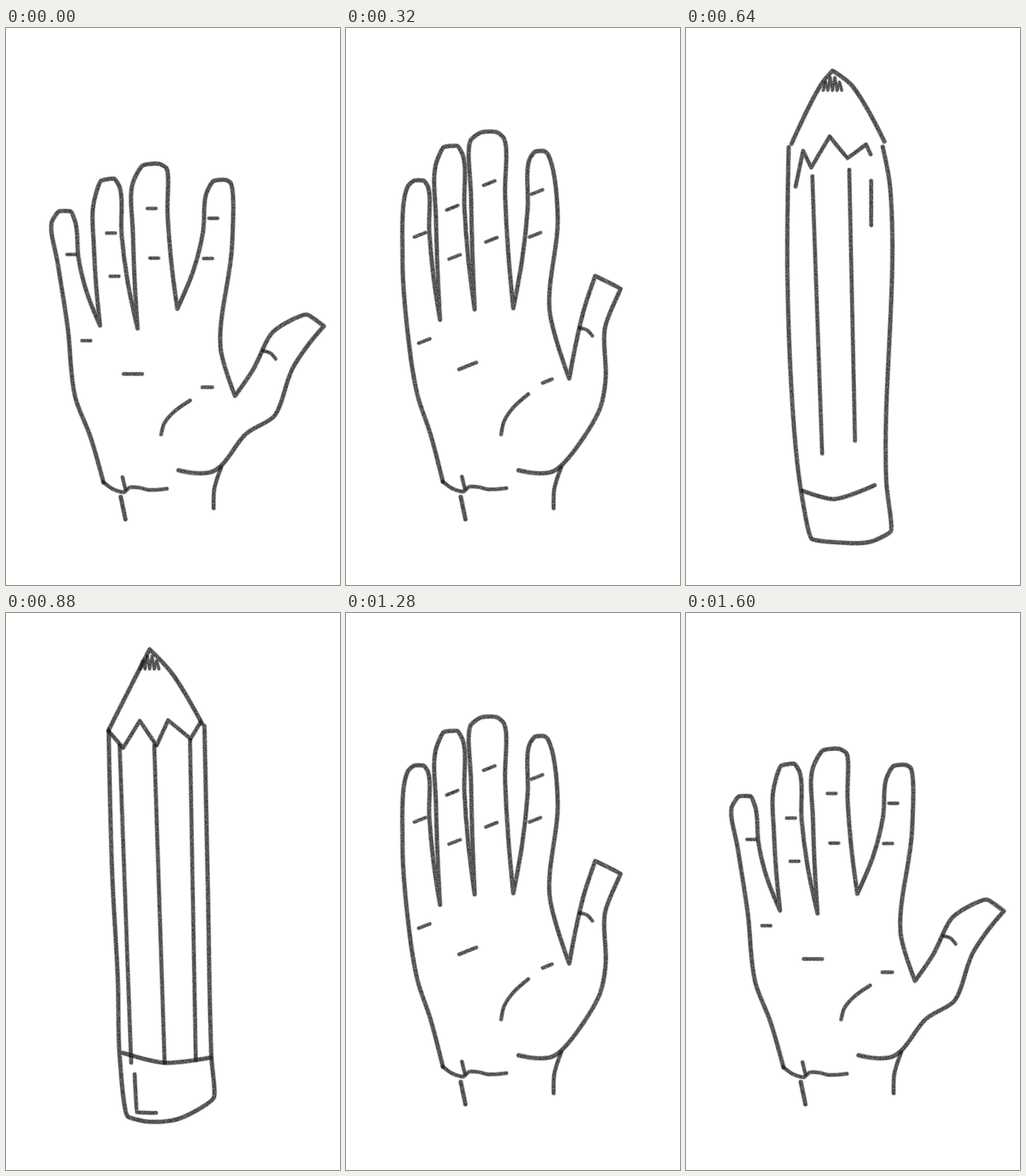
Animation of 579 by 966 pixels, one loop 1680 ms. Source, as an HTML page with a canvas:

```html
<!DOCTYPE html>
<html lang="en">
<head>
<meta charset="utf-8">
<title>Hand and pencil</title>
<style>
html, body { margin: 0; width: 100%; height: 100%; overflow: hidden; background: #fff; }
canvas { display: block; width: 579px; height: 966px; }
</style>
</head>
<body>
<canvas id="stage" width="579" height="966"></canvas>
<script>
const ctx = document.getElementById('stage').getContext('2d');
const STEP = 80;

// Hand poses. A finger is left shoulder, right shoulder, height of the tip.
const open = {
  fused: 0, tilt: 0, creases: 1,
  side: [169,788, 146,708, 120,640, 107,520, 90,410],
  fingers: [[79,338, 121,340, 316], [151,310, 197,276, 260], [219,272, 278,243, 235], [347,288, 389,268, 263]],
  valleys: [[163,516], [228,521], [297,487]],
  web: [392,375, 372,555, 397,638],
  thumb: [428,593, 463,527, 521,497, 551,517, 525,548, 497,590, 465,673],
  palm: [269,705, 319,646], lifeLine: [220,600]
};
const relaxed = {
  fused: 0, tilt: -.38, creases: 1,
  side: [168,787, 146,703, 124,637, 106,520, 98,400],
  fingers: [[107,275, 142,275, 264], [155,240, 203,222, 203], [216,195, 274,192, 180], [318,228, 351,221, 213]],
  valleys: [[163,506], [223,488], [290,486]],
  web: [367,325, 353,490, 387,608],
  thumb: [398,550, 412,490, 432,430, 476,452, 449,520, 450,610, 441,658],
  palm: [269,705, 316,635], lifeLine: [211,586]
};
const closed = {
  fused: 1, tilt: -.4, creases: 0,
  side: [192,779, 165,705, 147,605, 136,460, 144,285],
  fingers: [[174,196, 208,171, 173], [222,150, 252,120, 121], [252,120, 301,142, 115], [301,142, 339,139, 136]],
  valleys: [[180,299], [246,322], [291,467]],
  web: [360,245, 364,400, 375,562],
  thumb: [364,408, 357,390, 368,371, 400,388, 428,460, 428,550, 436,645],
  palm: [276,619, 328,535], lifeLine: [191,390]
};

const sharp = {
  body: [178,205, 184,450, 194,640, 197,768, 211,873, 245,882, 300,877, 360,841, 356,768, 350,480, 344,196],
  tip: [178,203, 225,110, 249,63, 288,105, 340,192],
  wood: [178,205, 203,234, 232,187, 261,230, 281,186, 320,218, 337,190],
  grooves: [[197,230, 217,780], [257,230, 275,780], [319,220, 329,775]],
  band: [203,763, 275,780, 355,771],
  shine: [223,800, 227,866, 260,867]
};
const blunt = {
  body: [178,207, 176,440, 187,690, 199,800, 218,886, 260,892, 320,891, 355,873, 347,783, 354,278, 341,206],
  tip: [183,201, 235,97, 254,74, 286,98, 344,197],
  wood: [190,275, 203,213, 217,242, 249,188, 280,226, 312,202, 320,219],
  grooves: [[219,257, 236,738], [283,246, 293,716], [321,265, 321,342]],
  band: [203,803, 256,817, 327,793]
};

// Blends numbers, lists and objects alike; keys must exist on both sides.
function mix(a, b, t) {
  if (typeof a === 'number') return a + (b - a) * t;
  if (Array.isArray(a)) return a.map((v, i) => mix(v, b[i], t));
  return Object.fromEntries(Object.keys(a).filter(k => k in b).map(k => [k, mix(a[k], b[k], t)]));
}

const pairs = flat => Array.from({ length: flat.length / 2 }, (_, i) => [flat[2 * i], flat[2 * i + 1]]);

// Starts upright and bends towards its end.
const bend = (from, to, start = 0) => [0, 1, 2, 3].map(i => {
  const t = start + (1 - start) * i / 3;
  return [mix(from[0], to[0], t * t), mix(from[1], to[1], t)];
});

const dash = ([x, y], length, tilt) => {
  const dx = Math.cos(tilt) * length / 2, dy = Math.sin(tilt) * length / 2;
  return [[x - dx, y - dy], [x + dx, y + dy]];
};

const cap = ([lx, ly, rx, ry, top]) => [
  [lx, ly], [mix(lx, rx, .3), mix(top, ly, .1)], [mix(lx, rx, .8), mix(top, ry, .1)], [rx, ry]
];

// Tangents shrink as corners get sharper, so points stay pointed.
function handle(points, i) {
  if (!points[i - 1] || !points[i + 1]) return [0, 0];
  const unit = (a, b) => {
    const d = Math.hypot(b[0] - a[0], b[1] - a[1]) || 1;
    return [(b[0] - a[0]) / d, (b[1] - a[1]) / d];
  };
  const u = unit(points[i - 1], points[i]), v = unit(points[i], points[i + 1]);
  const flat = Math.max(0, u[0] * v[0] + u[1] * v[1]);
  return [(u[0] + v[0]) * flat / 6, (u[1] + v[1]) * flat / 6];
}

function stroke(width, points) {
  ctx.beginPath();
  ctx.moveTo(...points[0]);
  for (let i = 1; i < points.length; i++) {
    const [a, b] = [points[i - 1], points[i]], d = Math.hypot(b[0] - a[0], b[1] - a[1]);
    const u = handle(points, i - 1), v = handle(points, i);
    ctx.bezierCurveTo(a[0] + u[0] * d, a[1] + u[1] * d, b[0] - v[0] * d, b[1] - v[1] * d, ...b);
  }
  for (const [grow, alpha] of [[1, .35], [-1.4, .85]]) {
    ctx.lineWidth = width + grow;
    ctx.globalAlpha = alpha;
    ctx.stroke();
  }
}

function drawHand({ fused, tilt, creases, side, fingers, valleys, web, thumb, palm, lifeLine }) {
  const together = fused > .5;
  const heel = [[416,704], [372,760], [356,770], [328,772], [299,767]];
  const outline = pairs(side);
  fingers.forEach((finger, i) => {
    outline.push(...cap(finger));
    if (i === 3) return;
    const start = together ? .3 : 0;
    const down = bend(finger.slice(2, 4), valleys[i], start);
    const up = bend(fingers[i + 1], valleys[i], start).reverse();
    if (together) stroke(8, [...down, ...up]);
    else outline.push(...down.slice(1), ...up.slice(1, -1));
  });
  outline.push(...pairs(web));
  const rest = [...pairs(thumb), ...heel];
  if (together) stroke(8, rest); else outline.push(...rest);
  stroke(8, outline);

  const [x, y] = side;
  const fold = [0,0, 17,12, 36,17, 45,9, 61,9, 78,13, 110,11];
  stroke(7, pairs(fold).map(([dx, dy]) => [x + dx, y + dy]));
  stroke(7, [[x + 33, y - 9], [x + 38, y + 12]]);
  stroke(7.5, [[373,762], [361,800], [360,833]]);
  stroke(8, [[199,813], [207,852]]);
  stroke(7 + 2 * fused, bend(palm.slice(0, 2), palm.slice(2)));
  stroke(7, dash(lifeLine, 32, tilt));
  if (creases < 1) return;

  const roots = [side.slice(6, 8), ...valleys, web.slice(2, 4)];
  const places = [[.38, 1.12], [.37, .66], [.29, .61], [.26, .53]];
  fingers.forEach(([lx, , rx, , top], i) => {
    const root = mix(roots[i], roots[i + 1], .5);
    for (const t of places[i]) stroke(6.5, dash(mix([(lx + rx) / 2, top], root, t), 15 - 15 * tilt, tilt));
  });
  stroke(7, dash([349, 623 + 28 * tilt], 17, tilt));
  const joint = mix(thumb.slice(0, 2), thumb.slice(2, 4), .5);
  stroke(6.5, [joint, [joint[0] + 13, joint[1] + 4], [joint[0] + 22, joint[1] + 14]]);
}

function drawPencil({ body, tip, wood, grooves, band, shine = [] }) {
  stroke(8, pairs(body));
  stroke(8, pairs(tip));
  stroke(7.5, pairs(wood));
  stroke(8, pairs(band));
  grooves.forEach(g => stroke(7.5, pairs(g)));
  if (shine.length) stroke(7.5, pairs(shine));
  const [x, y] = tip.slice(4);
  stroke(6, Array.from({ length: 9 }, (_, i) =>
    [x + (i - 4) * 4, y + (i % 2 ? 8 + 4 * Math.abs(i - 4) : 34)]));
}

function makeGrain(size) {
  const tile = document.createElement('canvas');
  tile.width = tile.height = size;
  const g = tile.getContext('2d');
  let seed = 7;
  for (let y = 0; y < size; y++) for (let x = 0; x < size; x++) {
    seed = (seed * 1664525 + 1013904223) >>> 0;
    g.fillStyle = `rgba(24,24,24,${.5 + .5 * seed / 2 ** 32})`;
    g.fillRect(x, y, 1, 1);
  }
  return ctx.createPattern(tile, 'repeat');
}

const poses = [
  ...[0, .25, .5, .75, 1].map(t => mix(open, relaxed, t)),
  mix(relaxed, closed, .5), closed,
  { ...mix(sharp, blunt, 1.8), grooves: blunt.grooves },
  blunt, sharp, { ...sharp, ...mix(sharp, blunt, -.12) }
];

ctx.strokeStyle = makeGrain(256);
ctx.lineCap = ctx.lineJoin = 'round';

// The poses play forwards and then back.
const last = poses.length - 1;
let shown;
function frame() {
  const step = Math.floor(performance.now() / STEP) % (2 * last + 1);
  const pose = poses[last - Math.abs(last - step)];
  if (pose !== shown) {
    ctx.clearRect(0, 0, 579, 966);
    (pose.body ? drawPencil : drawHand)(shown = pose);
  }
  requestAnimationFrame(frame);
}
frame();
</script>
</body>
</html>
```
